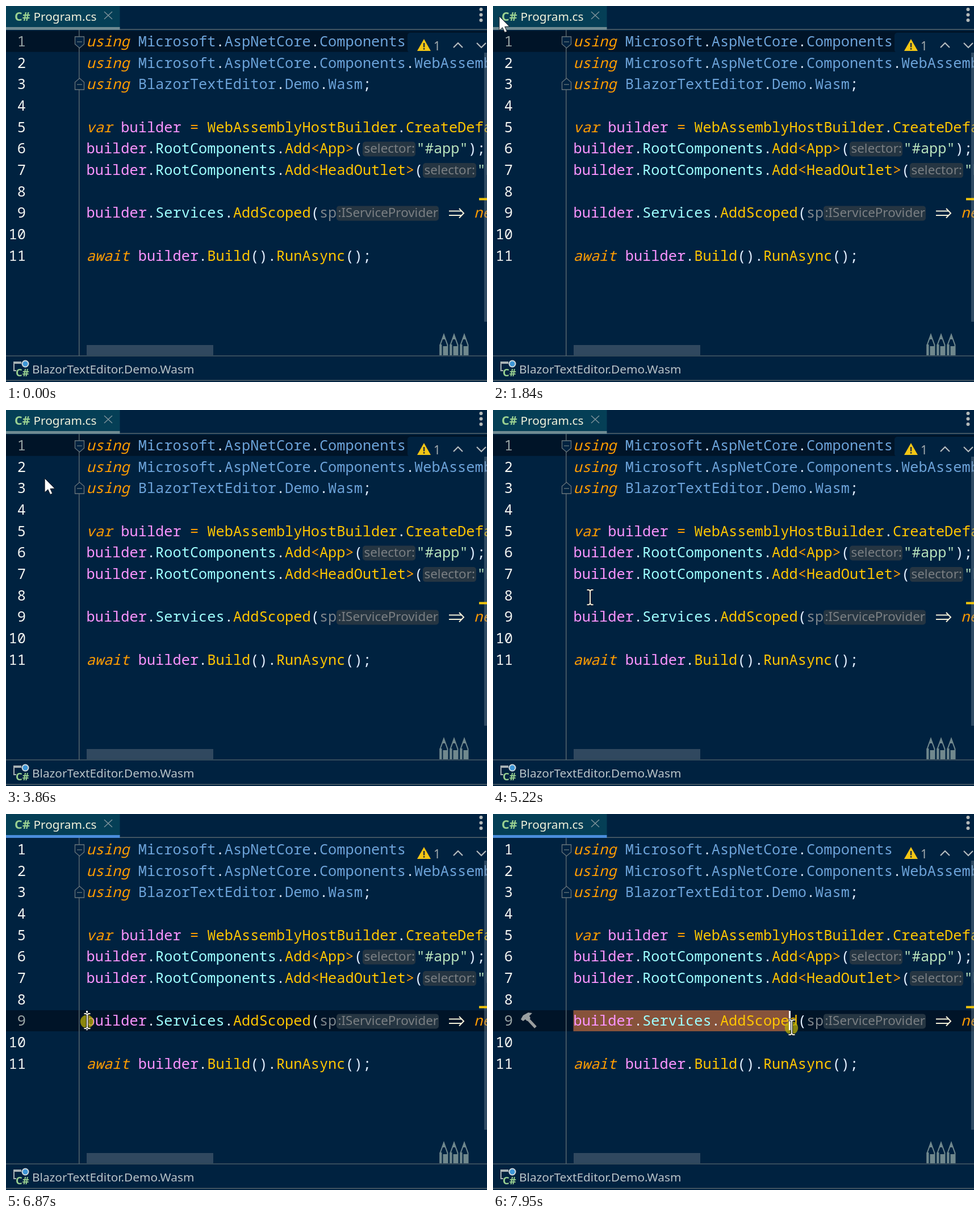
Recreate the animation shown at these times as an HTML page with a canvas. Size 847 px wide and 661 px high, loop 8000 ms.

```html
<!DOCTYPE html>
<html lang="en">
<head>
<meta charset="utf-8">
<title>Code editor</title>
<style>
html, body { margin: 0; width: 100%; height: 100%; overflow: hidden; background: #002240; }
canvas { display: block; width: 847px; height: 661px; }
</style>
</head>
<body>
<canvas id="stage" width="847" height="661"></canvas>
<script>
const ctx = document.getElementById('stage').getContext('2d');
const LOOP = 8000, W = 847;
const LEFT = 141.5, CHAR = 15.2, TOP = 43.7, ROW = 37.65;
const MONO = '25.33px "Noto Sans Mono", "DejaVu Sans Mono", monospace';
const UI = '"Noto Sans", "Open Sans", sans-serif';
const BG = '#002240', LINE = '#56646c';
const INK = { k: '#ff9d00', n: '#6ca3d9', p: '#e1efff', v: '#fb94ff',
              c: '#9effff', f: '#ffc600', s: '#b9e4bd', g: '#7d858b' };
const PRESS = 6790, USAGES = 7000, DRAG = 7200;

// Pointer path: time, x, y
const PATH = [
  [180, 685, 648], [560, 390, 390], [940, 112, 145], [1300, 52, 72], [1760, 12, 19],
  [1840, 11, 18], [3300, 11, 18], [3580, 37, 75], [3860, 68, 120], [4060, 106, 121],
  [4480, 126, 172], [4880, 159, 255], [5220, 171, 329], [5360, 176, 374],
  [5560, 176, 374], [5900, 213, 398], [6330, 176, 382], [6750, 143, 364],
  [7200, 143, 364], [7580, 345, 369], [7950, 526, 375], [8000, 526, 375]
];

function slope(i, axis) {
  if (i <= 0 || i >= PATH.length - 1) return 0;
  const rate = j => (PATH[j + 1][axis] - PATH[j][axis]) / (PATH[j + 1][0] - PATH[j][0]);
  const a = rate(i - 1), b = rate(i);
  return a * b <= 0 ? 0 : 2 * a * b / (a + b);
}

function pointer(t) {
  let i = 0;
  while (i < PATH.length - 2 && t >= PATH[i + 1][0]) i++;
  const span = PATH[i + 1][0] - PATH[i][0], u = (t - PATH[i][0]) / span;
  const at = axis => {
    const a = PATH[i][axis], b = PATH[i + 1][axis];
    return a + (b - a) * u * u * (3 - 2 * u)
      + span * u * (1 - u) * ((1 - u) * slope(i, axis) - u * slope(i + 1, axis));
  };
  return { x: at(1), y: at(2) };
}

function box(x, y, w, h, color, r = 0) {
  ctx.fillStyle = color;
  ctx.beginPath();
  ctx.roundRect(x, y, w, h, r);
  ctx.fill();
}

function trace(points, closed) {
  ctx.beginPath();
  points.forEach(([x, y]) => ctx.lineTo(x, y));
  if (closed) ctx.closePath();
}

function stroke(points, color, width = 1, closed = false) {
  trace(points, closed);
  ctx.strokeStyle = color;
  ctx.lineWidth = width;
  ctx.stroke();
}

function fill(points, color) {
  trace(points, true);
  ctx.fillStyle = color;
  ctx.fill();
}

function disc(x, y, r, color) {
  ctx.fillStyle = color;
  ctx.beginPath();
  ctx.arc(x, y, r, 0, 7);
  ctx.fill();
}

function text(str, x, y, size, color, weight = '') {
  ctx.font = `${weight} ${size}px ${UI}`;
  ctx.fillStyle = color;
  ctx.fillText(str, x, y);
}

const rowTop = row => TOP + (row - 1) * ROW;
const baseline = row => 71 + (row - 1) * ROW;

// Each token starts with its ink letter; returns the x after the last one.
function code(row, x, ...tokens) {
  for (const token of tokens) {
    for (const part of token.slice(1).split(/([.()<>;])/)) {
      const ink = /^[.();]$/.test(part) ? 'p' : /^[<>]$/.test(part) ? 'k' : token[0];
      ctx.font = (token[0] === 'k' && part.length > 2 ? 'italic ' : '') + MONO;
      ctx.fillStyle = INK[ink];
      ctx.fillText(part, x, baseline(row));
      x += part.length * CHAR;
    }
  }
  return x;
}

function hint(row, x, width, label) {
  const y = rowTop(row) + 6.5;
  box(x, y, width, 26, '#253542', 5);
  text(label, x + 2.5, y + 19.5, 22.4, '#7a7f83');
}

function lines() {
  const ns = 'nMicrosoft.AspNetCore.Components';
  code(1, LEFT, 'kusing ', ns, 'p;');
  code(2, LEFT, 'kusing ', ns + '.WebAssembly');
  code(3, LEFT, 'kusing ', 'nBlazorTextEditor.Demo.Wasm', 'p;');
  code(5, LEFT, 'kvar ', 'vbuilder ', 'k= ', 'fWebAssemblyHostBuilder.CreateDefault');
  const root = ['vbuilder.', 'cRootComponents.'];
  code(6, LEFT, ...root, 'fAdd<App>(');
  hint(6, 628, 93, 'selector:');
  code(6, 722.5, 's"#app"', 'p);');
  code(7, LEFT, ...root, 'fAdd<HeadOutlet>(');
  hint(7, 734, 94, 'selector:');
  code(7, 829.5, 's"head');
  code(9, LEFT, 'vbuilder.', 'cServices.', 'fAddScoped(', 'gsp');
  hint(9, 582, 180, ':IServiceProvider');
  for (const y of [360.5, 368]) stroke([[780, y], [802, y]], '#f3efd8', 2);
  stroke([[798, 356], [806, 364.2], [798, 372.5]], '#f3efd8', 2);
  code(9, 824, 'knew');
  code(11, LEFT, 'kawait ', 'vbuilder.', 'fBuild().RunAsync();');
}

function numbers(active) {
  ctx.font = MONO;
  ctx.textAlign = 'right';
  for (let row = 1; row <= 11; row++) {
    ctx.fillStyle = row === active ? '#98a4a4' : '#f4f6f2';
    ctx.fillText(row, 35, baseline(row));
  }
  ctx.textAlign = 'left';
}

function fold(y, dir) {
  const pts = [[121.5, y - 9 * dir], [137.5, y - 9 * dir], [137.5, y + 4 * dir],
               [129.5, y + 11 * dir], [121.5, y + 4 * dir]];
  fill(pts, BG);
  stroke(pts, '#6a767b', 1.3, true);
  stroke([[125, y], [134, y]], '#6a767b', 1.3);
}

function tabs(focused) {
  box(0, 0, W, 42, BG);
  box(200, 40.5, W - 200, 1.5, LINE);
  box(0, 0, 200.5, 38, '#053f56');
  box(0, 37, 200.5, 5, focused ? '#4a8ddb' : '#6e8a91');
  text('C#', 15, 26, 21.5, '#9ad191', 'bold');
  text('Program.cs', 48.5, 26, 20.8, '#f2f2dc');
  stroke([[173, 10], [187, 23]], '#7d929a', 1.5);
  stroke([[187, 10], [173, 23]], '#7d929a', 1.5);
  for (const y of [6, 15.5, 25]) disc(836.5, y, 3, '#b5bab9');
}

function inspections() {
  box(707, 47, 150, 35, BG, 5);
  fill([[736, 58], [748, 79], [724, 79]], '#f3c614');
  box(734.8, 65, 2.6, 7.5, '#27313a');
  box(734.8, 74, 2.6, 2.6, '#27313a');
  text('1', 753, 78, 21, '#a5adb0');
  stroke([[788, 73], [796, 65], [804, 73]], '#b4bcbe', 2.2);
  stroke([[829, 65], [837, 73], [845, 65]], '#b4bcbe', 2.2);
}

function pencil(x) {
  const c = '#70888d';
  stroke([[x + 1, 614], [x + 1, 596], [x + 7.5, 578], [x + 14, 596], [x + 14, 614]], c, 2);
  fill([[x + 7.5, 576], [x + 11, 586], [x + 4, 586]], c);
  box(x, 595, 4, 19, c);
  box(x + 6, 598, 8, 16, c);
}

function footer() {
  box(0, 615, W, 46, BG);
  box(0, 614.5, W, 1.2, LINE);
  box(0, 657.5, W, 1.5, LINE);
  box(13, 625, 14, 4, '#a9b1b4');
  box(13, 625, 2, 17, '#a9b1b4');
  box(13, 640, 5, 2, '#a9b1b4');
  disc(34, 629, 6.5, '#d3dbde');
  disc(34, 629, 4.5, '#3e96d6');
  text('C#', 17, 651, 18.5, '#9ad191', 'bold');
  text('BlazorTextEditor.Demo.Wasm', 46, 646, 20.8, '#b9c3c8');
}

function tooltip() {
  box(9, 56, W, 61, '#5b7680');
  box(10, 57, W, 59, '#033e5b');
  text('C:\\Users\\marlo\\Repos\\Blazor.Text.Editor\\BlazorTextEditor.Demo.Wasm\\Program.cs',
    30, 95, 20.8, '#f3f2df');
}

function hammer() {
  const c = '#9b9fa0';
  fill([[49, 361], [53, 354], [62, 349], [69, 350], [64, 355], [66, 359], [60, 364], [57, 361], [53, 364]], c);
  stroke([[61, 360], [75, 375]], c, 5);
}

function arrow({ x, y }) {
  const pts = [[0, 0], [0, 25], [5.7, 19.8], [9.7, 28.5], [13.6, 26.8], [9.8, 18.4], [17.8, 18]]
    .map(([a, b]) => [x + a, y + b]);
  fill(pts, '#fff');
  stroke(pts, '#101820', 1, true);
}

function beam({ x, y }) {
  const shape = (color, width) => {
    stroke([[x, y - 11], [x, y + 11]], color, width);
    for (const d of [-1, 1]) {
      stroke([[x - 5.5, y + 13 * d], [x - 2, y + 13 * d], [x, y + 11 * d],
              [x + 2, y + 13 * d], [x + 5.5, y + 13 * d]], color, width);
    }
  };
  shape('#0a1624', 4);
  shape('#f7f2df', 2);
}

function draw(t) {
  const pos = pointer(t), pressed = t >= PRESS, active = pressed ? 9 : 1;
  const cols = t < DRAG ? 0 : Math.max(0, Math.min(25, Math.round((pos.x - LEFT) / CHAR)));

  box(0, 0, W, 661, BG);
  box(0, rowTop(active), W, 37, '#001428');
  if (t >= USAGES && cols < 5) {
    for (const [row, col] of [[5, 4], [6, 0], [7, 0], [9, 0], [11, 6]])
      box(LEFT + col * CHAR, rowTop(row), 7 * CHAR, 37, '#0d3a5c');
  }
  box(128, 42, 1.5, 573, LINE);
  if (cols) box(LEFT, rowTop(9), cols * CHAR, 37, '#87533b');
  fold(63, 1);
  fold(138, -1);
  numbers(active);
  lines();
  inspections();
  box(842, 82, 5, 473, 'rgba(112,132,150,.42)');
  box(833, 337.5, 14, 4, '#f0c40c');
  box(142, 596, 223, 18, '#30485f');
  [763.5, 781.5, 799.5].forEach(pencil);
  tabs(pressed);
  footer();
  if (t >= 7430) hammer();
  if (t >= 2370 && t < 3500) tooltip();

  if (pressed) {
    disc(pos.x - 0.5, pos.y + 1, 11.7, 'rgba(186,174,6,.74)');
    box(LEFT - 0.5 + cols * CHAR, 346, 3, 34, '#fff');
  }
  if (t >= 180) {
    const overText = pos.x > 130 && pos.y > 42 && pos.y < 614;
    (overText ? beam : arrow)(pos);
  }
}

function tick(now) {
  draw(now % LOOP);
  requestAnimationFrame(tick);
}
draw(0);
requestAnimationFrame(tick);
</script>
</body>
</html>
```
